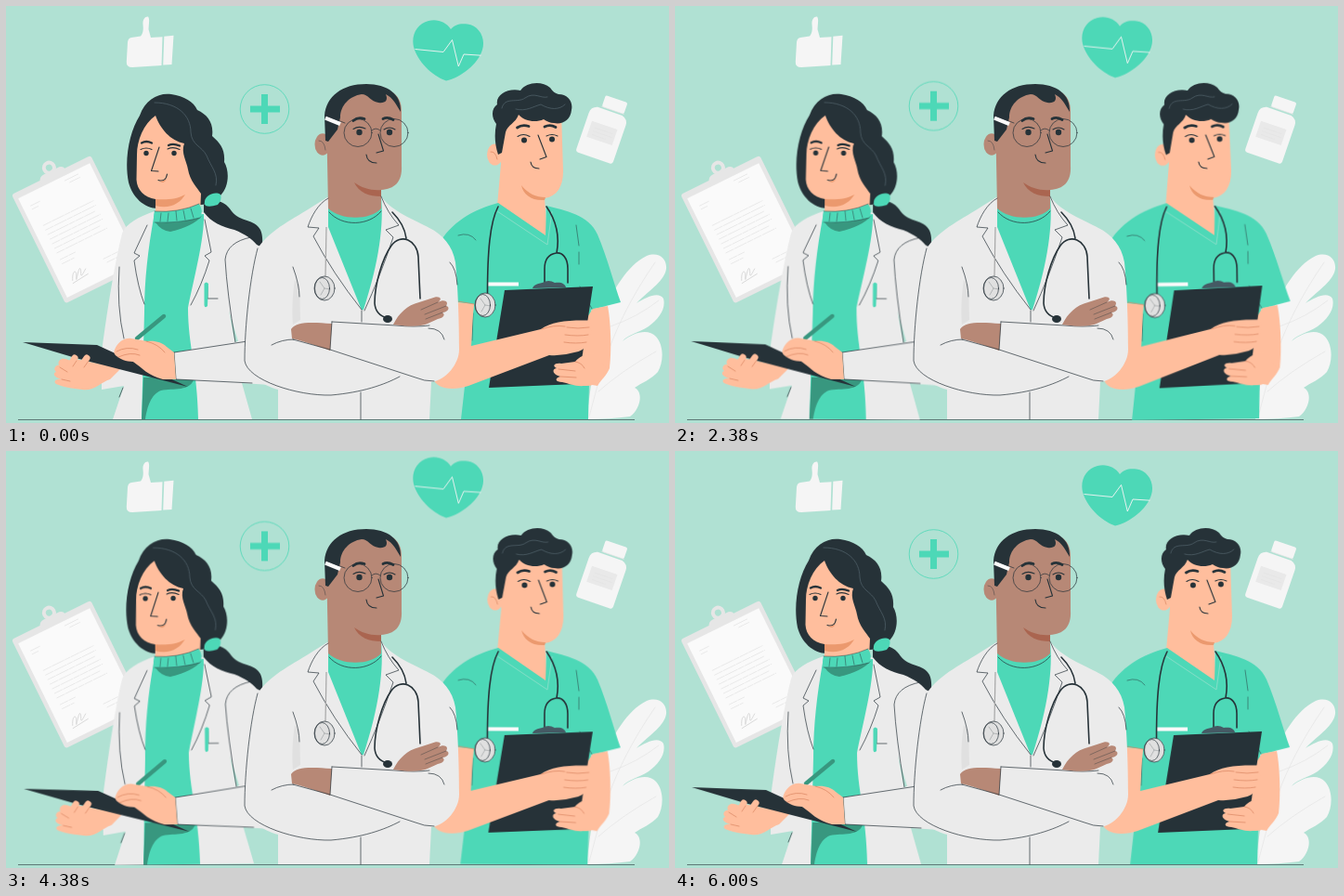
Animation of 714x449 px, one loop 6.04 s. Source, as an HTML page:

```html
<!DOCTYPE html>
<html lang="en">
<head>
<meta charset="utf-8">
<title>Medical team</title>
<style>
  html, body { margin: 0; width: 100%; height: 100%; overflow: hidden; background: #b0e1d3; }
  svg { display: block; width: 100vw; height: 100vh; }
  .green { fill: #4dd8b7; }
  .shade { fill: #38977f; }
  .dark { fill: #263238; }
  .coat { fill: #ebebeb; }
  .pale { fill: #f5f5f5; }
  .grey { fill: #e0e0e0; }
  .sky { fill: #b0e1d3; }
  .skin { fill: #ffbe9d; }
  .blush { fill: #eb996e; }
  .brown { fill: #b78876; }
  .umber { fill: #aa6550; }
  .ink, .tube, .brow, .face, .crease, .strand, .soft {
    fill: none; stroke: #263238; stroke-width: .7; stroke-linecap: round; stroke-linejoin: round;
  }
  .tube { stroke-width: 1.6; }
  .brow { stroke-width: 2.8; }
  .face { stroke-width: 1.1; }
  .crease { stroke: #d98560; }
  .strand { stroke: #53656e; }
  .soft { stroke: #e4e4e4; }

  /* sine-like easing, so alternating runs read as one smooth swing */
  .float, .lean { animation: float 1510ms cubic-bezier(.37, 0, .63, 1) infinite alternate; }
  .lean { animation-name: lean; }
  .woman { --a: .6deg; transform-origin: 190px 245px; animation-duration: 3020ms; animation-delay: -1510ms; }
  .nurse { --a: .7deg; transform-origin: 560px 265px; animation-delay: -755ms; }
  @keyframes float { to { transform: translateY(-8.8px); } }
  @keyframes lean {
    from { transform: rotate(calc(-1 * var(--a))); }
    to { transform: rotate(var(--a)); }
  }
</style>
</head>
<body>
<svg viewBox="0 0 714 449">
  <defs>
    <clipPath id="floor"><path d="M0,0H714V445.3H0Z"/></clipPath>
    <g id="disc">
      <ellipse class="grey" rx="11" ry="13"/>
      <ellipse class="ink" rx="11" ry="13"/>
      <ellipse class="ink" cx="-2.500" rx="8" ry="11.500"/>
      <path class="ink" d="M-5,-7L0,0L-4,7M0,0L6,1" opacity=".35"/>
    </g>
  </defs>

  <!-- clipboard with paper -->
  <g transform="translate(6 203) rotate(-26.3)">
    <rect fill="#e6e6e6" width="95" height="131" rx="3"/>
    <rect x="4.500" y="7" width="86" height="119" fill="#fafafa"/>
    <circle cx="49" cy="-8" r="5.500" fill="none" stroke="#e6e6e6" stroke-width="4"/>
    <path fill="#e6e6e6" d="M34,6V1Q35,-4 41,-4H57Q63,-4 64,1V6Z"/>
    <g class="soft">
      <path d="M13,20H24M13,24H20M58,12H74M62,16H74"/>
      <path stroke-dasharray="9 1.5 14 1.5 6 1.5" d="M16,45H76M16,50.500H76M16,56H72M16,61.500H76M16,67H76M16,72.500H70M16,78H76M16,86H34M16,91H30M58,106H75M60,111H75"/>
      <path stroke="#d0d0d0" d="M18,112C22,102 27,103 24,109S21,114 27,107S31,106 29,110S33,109 36,107M17,115L36,113"/>
    </g>
  </g>

  <!-- thumb up -->
  <path class="pale" d="M135,34L145,32.500C148,29 148,25 147.500,20C147,14 150,11 153,11.500Q154.500,13 154,18L153.500,25L156,34L168.500,33.300L167.500,64L136,66Q129.500,66 129.800,60L131,39Q131.500,34.500 135,34ZM170.300,32.700L180.500,31.800L178.500,63L169.200,63.500Z"/>

  <!-- bottle -->
  <g transform="translate(642 138) rotate(19)">
    <path class="pale" d="M-21,-17Q-21,-24 -14,-26H14Q21,-24 21,-17V24Q21,27 18,27H-18Q-21,27 -21,24Z"/>
    <rect class="pale" x="-10" y="-41" width="25" height="13" rx="2"/>
    <path class="soft" d="M-10,-28H15"/>
    <rect x="-15" y="-10" width="29" height="18" fill="#e9e9e9"/>
    <path class="soft" d="M-10,-4H10M-10,0H11M-10,4H5"/>
  </g>

  <!-- heart and plus badge -->
  <g class="float">
    <path class="green" d="M479,25C474,17 464,13.500 455,16C443,19 436,31 439,44C443,59 458,75 474,80.500C490,77 509,62 513,47C517,34 509,21 497,19.500C489,18.500 483,20 479,25Z"/>
    <path d="M440.500,46.500L471,49.500L480.500,36.500L487.300,65L493,52L511.500,53.200" fill="none" stroke="#f5f5f5" stroke-width=".9"/>
    <circle cx="278.500" cy="111" r="26.300" fill="none" stroke="#4dd8b7" stroke-width=".8"/>
    <path class="green" d="M275,95H282V107.500H295V114.500H282V127H275V114.500H263V107.500H275Z"/>
  </g>

  <!-- leaf -->
  <path class="pale" d="M625,445L640,335C655,305 668,280 690,269C703,264 712,272 711,283C709,296 695,304 679,320C690,313 703,307 708,315C711,326 703,337 692,345C681,352 669,354 664,361C676,351 692,347 700,356C709,366 708,384 702,394C695,402 684,406 677,411C687,416 683,434 672,442Q650,445 625,445Z"/>
  <path class="soft" d="M628,442C640,400 648,350 699,276M651,345Q680,335 703,317M638,415Q664,392 700,372"/>

  <path d="M13,445.500H677" stroke="#263238" stroke-width=".8" opacity=".75"/>

  <g clip-path="url(#floor)">
    <!-- woman -->
    <g class="lean woman">
      <path class="dark" d="M164,218C148,218 136,205 132,190C127,165 133,135 144,118C150,100 165,93 178,95C192,97 202,103 206,112C217,117 224,126 222,140C231,148 236,154 235,168C241,178 240,195 231,204C224,212 212,216 204,213Z"/>
      <path class="skin" d="M161,118C166,132 177,145 192,148C188,158 195,168 196,176C198,188 206,196 210,202L209,224L161,226V208C149,206 141,198 140.500,187L141,160C141,145 148,127 161,118Z"/>
      <path class="blush" d="M161,208C173,209 184,208 193,203C187,213 176,219 161,215Z"/>
      <path class="strand" d="M160,104C185,104 199,118 199,136C200,150 211,151 216,161C221,174 229,180 226,193"/>
      <path class="brow" d="M146,147.500Q151,144.500 157,147.500M175,150Q180,147.500 187,150.500" style="stroke-width:2.300"/>
      <path class="face" d="M145,154.500Q151,151.500 157,154.500M174,154Q180,151 187,154.500M165,152L156.500,177.500L164,178M164,187.500Q172,190 173.500,181"/>
      <path class="blush" d="M166,189Q170,192 173,186L172,187Q170,188.500 166,189Z"/>
      <circle class="dark" cx="151" cy="158.500" r="2.700"/>
      <circle class="dark" cx="181" cy="158.500" r="2.700"/>

      <path class="coat" d="M160,221C143,227 129,234 125,245C118,273 110,320 103,373L103,413L127,409L115,445H150L165,230Z"/>
      <path class="coat" d="M209,221C232,231 250,239 262,248L285,262V408L254,406L265,445H200L193,325Z"/>
      <path class="green" d="M159,228L213,224C214,250 202,295 196,325C196,365 206,390 207,445H146L149,330C149,295 153,262 159,228Z"/>
      <path class="shade" d="M161,233Q188,235 211,226Q202,237 177,243Q167,242 161,233ZM148,400H203C199,416 180,411 167,414C156,418 152,432 150,445H146Z"/>
      <path class="green" d="M160,221Q186,223 208,213Q213,221 209,228Q187,234 160,233Q158,227 160,221Z"/>
      <path class="ink" d="M160,221Q186,223 208,213M160,233Q187,234 209,228M167,223L166,232M175,223L174,232M183,221L184,231M191,220L193,230M199,218L202,228" opacity=".65"/>
      <path class="dark" d="M213,214C224,206 236,210 243,221C252,233 268,229 274,241C277,248 276,254 276,260L270,257C264,250 258,246 246,241C233,238 221,233 213,222Z"/>
      <path class="green" d="M214,210C215,204 225,199 231,203Q233,209 228,214Q219,217 215,215Q213,213 214,210Z"/>
      <path class="sky" d="M240,328L250,361L246.500,362Z"/>
      <path class="ink" d="M152,236L138,266L144,269L138,274Q142,303 149,321M214,230L221,265L214,269L219,274Q211,300 199,322M122,281Q119,324 127,358M126,411L122,421M264,249Q238,254 236,273Q238,308 247,362M217,302V315H228"/>
      <path class="green" d="M213.500,299Q215.500,296 218,299L217,323Q214,326 213.500,322Z"/>

      <path class="coat" d="M181,373L247,362L285,358V407L183,402Z"/>
      <path class="ink" d="M181,373L260,361M181,373L183,402L265,406"/>
      <path class="skin" d="M60,380C66,379 68,384 74,380L124,390L112,402C102,405 95,415 82,413C72,412 60,410 54,407C50,404 55,401 60,402C51,400 50,395 54,394C50,391 54,386 57,387Q55,382 60,380Z"/>
      <path class="dark" d="M18,362L98,365L196,410L75,379Z"/>
      <path d="M68,390L74,379M80,389L87,379" stroke="#ffbe9d" stroke-width="7" stroke-linecap="round"/>
      <path class="crease" d="M58,389L66,394M60,402L69,404M72,388L76,382M84,389L89,382"/>
      <path d="M170,334L141,358" stroke="#38977f" stroke-width="4.400" stroke-linecap="round"/>
      <path class="skin" d="M117,370C121,361 128,357 135,358L152,361C160,360 168,362 173,367L181,373L183,402H169C153,398 147,390 137,383C129,383 123,380 119,377Q115,374 117,370Z"/>
      <path class="crease" d="M119,372Q130,366 142,370M121,378Q134,372 144,376M151,361Q164,364 171,373"/>
    </g>

    <!-- nurse -->
    <g class="lean nurse">
      <ellipse class="skin" cx="526.500" cy="160" rx="8.500" ry="11.500"/>
      <path class="skin" d="M533,130L548,112L598,114L600,178C600,195 593,205 580,207L583,250L529,215L533,170Z"/>
      <path class="crease" d="M522,157Q527,156 529,165"/>
      <path class="blush" d="M555,193C562,202 571,206 581,206L580,209C566,210 557,203 555,193Z"/>
      <path class="dark" d="M530,160C526,148 526,137 528,127C522,119 523,110 529,106C527,96 540,88 554,91C560,82 577,80 586,88C589,92 591,94 595,95C605,95 611,103 609,112C608,123 599,128 590,126C586,126 582,124 579,122C570,126 558,124 552,117C549,126 540,128 538,136L534,158Z"/>
      <path class="strand" d="M534,110C537,97 551,105 559,99C569,92 576,100 583,98M549,111C560,114 568,108 576,106C586,112 596,112 602,106"/>
      <path class="brow" d="M550.500,131Q556,127 563,129.500M580,130Q586,127 592,130.500"/>
      <path class="face" d="M551,140.500Q557,136.500 564,140.500M582,140Q588,137 594,140M573,139L582,162.500L575,165M565,168Q566,175 574,175"/>
      <circle class="dark" cx="558" cy="144.500" r="3"/>
      <circle class="dark" cx="588" cy="143.500" r="3"/>

      <path class="green" d="M530,212L581,247L582,215C602,220 628,225 637,246C648,272 655,300 662,319L630,327L627,445H490L504,321L465,317V258C479,233 503,219 530,212Z"/>
      <path d="M529,221L583,257L588,221" fill="none" stroke="#93dfcc" stroke-width=".8"/>
      <path class="ink" d="M487,247Q499,243 506,252M614,236L617,258M617,265V278M503,331L502,360M631,326L618,302" opacity=".7"/>
      <rect x="519" y="297.500" width="33" height="4" fill="#fafafa"/>
      <path class="tube" d="M530,216C521,233 518.500,265 518.500,311M582,216C594,233 596,250 593,266M580,298V283C580,271 586,267 592.500,266S605,271 605,283V298"/>
      <use href="#disc" x="516" y="322"/>

      <path class="skin" d="M632,326L648,323C652,345 652,375 650,390C647,398 641,402 637,409L615,405L616,350Z"/>
      <path class="dark" d="M537,306L632,302L616,407L520,411Z"/>
      <path d="M567,304C569,298 577,299 581,296.500Q586,295 591,298C598,297 602,299 603,303Z" fill="#455a64"/>
      <path class="skin" d="M465,317L504,321C502,340 502,355 501,366L576,348C587,340 605,338 627,338.500Q632,341 629.500,347Q632,352 627.500,356Q629,361 625,363Q624,371 612,373Q599,377 585,376L498,409C480,415 462,412 460,400L470,360Z"/>
      <path class="crease" d="M577,348Q590,343 602,345M604,346Q616,348 628,346M602,354Q616,356 627,354M601,362Q614,364 625,362M487,318L504,321"/>
      <path class="skin" d="M646,389C642,401 637,410 623,409C613,410 605,406 599,405C592,405 590,401 597,399C589,397 587,391 593,390C588,388 590,384 598,385L613,383C618,377 625,374 634,375Z"/>
      <path class="crease" d="M595,391L613,393M597,399L614,400M613,383Q620,384 623,390"/>
      <path class="ink" d="M619,376L621,374" opacity=".5"/>
    </g>

    <!-- doctor -->
    <g>
      <path class="coat" d="M346,206L330,216C312,228 285,240 271,261C263,290 257,345 257,382C259,398 278,409 293,413V445H456L458,405C474,403 488,385 488,370C488,330 486,295 484,276C481,258 470,246 456,239C440,230 416,222 404,205Z"/>
      <path class="green" d="M347,207L404,205C407,235 402,275 385,327Q383,328 382,325L347,238Z"/>
      <ellipse class="brown" cx="341" cy="149" rx="8.500" ry="11.800"/>
      <path class="brown" d="M345,115C352,95 372,88 390,88C412,86 426,95 426,112V172C427,190 418,197 404,198V218C392,231 361,231 347,218Z"/>
      <path class="ink" d="M337,145Q343,145 344,155" opacity=".6"/>
      <path class="umber" d="M375,190C383,196 394,199 404,198V205C391,205 380,201 375,190Z"/>
      <path class="ink" d="M348,222C362,238 391,237 404,221"/>
      <path class="dark" d="M344,145L343,118C345,97 362,84 388,84C411,84 426,95 425,114C420,106 417,99 409,95C412,102 408,105 401,104C393,103 390,95 383,95C370,97 360,107 360,120L357,133L347,146Z"/>
      <path d="M344,120.500L360,127" stroke="#fafafa" stroke-width="4.500"/>
      <path class="ink" d="M344,118L365,126M394,134Q398,130 403,134"/>
      <circle class="ink" cx="379" cy="136.500" r="15"/>
      <circle class="ink" cx="418" cy="136.500" r="15"/>
      <path class="brow" d="M374,123.500Q379,119 386,121.500M406,121.500Q411,119 417,122.500"/>
      <path class="face" d="M374,132.500Q380,128.500 387,132M407,133Q413,129 419,133M401,138L406.500,156L399,158M388,160Q389,169 399,169"/>
      <circle class="dark" cx="380.500" cy="136" r="3.200"/>
      <circle class="dark" cx="413" cy="136" r="3.200"/>

      <path class="grey" d="M311,295C308,315 308,332 309,343L317,338L316,300Z"/>
      <path class="ink" d="M347,207C336,213 329,226 325,238L337,239L331,248Q352,288 383,327M404,205Q411,223 423,236L409,241L417,249Q403,291 386,328M383,328V340M382,416V445"/>
      <path class="ink" d="M271,261C263,290 257,345 257,382C260,403 314,420 350,419C384,416 407,408 424,399M309,281Q316,300 316,313M286,365Q297,359 310,359M478,276Q485,283 486,300M455,347Q469,347 472,359"/>
      <path d="M345,238L344,291" stroke="#a6a6a6" stroke-width="1.200"/>
      <use href="#disc" x="343" y="304"/>
      <path class="tube" d="M416,222Q429,235 431,250M446,315L444,270C443,252 425,244 415,258C405,272 397,300 397,320Q398,333 411,336"/>
      <ellipse class="dark" cx="411" cy="337" rx="5" ry="4"/>

      <path class="brown" d="M307,348C312,340 327,340 351,342L349,371C335,366 318,360 308,358Z"/>
      <path class="ink" d="M351,340L349,370M351,340L420,344Q440,346 456,344M309,359L349,370L441,400Q450,404 461,404"/>
      <path class="brown" d="M417,343C423,331 432,322 445,319L462,313.500C468,312.500 470,316 465,319C473,315 477,319 474,323C479,324 476,330 470,330C474,333 470,336 465,337L454,342Q443,347 417,343Z"/>
      <path class="ink" d="M465,319L447,327M474,323L451,332M470,330L452,337" opacity=".55"/>
    </g>
  </g>
</svg>
</body>
</html>
```
